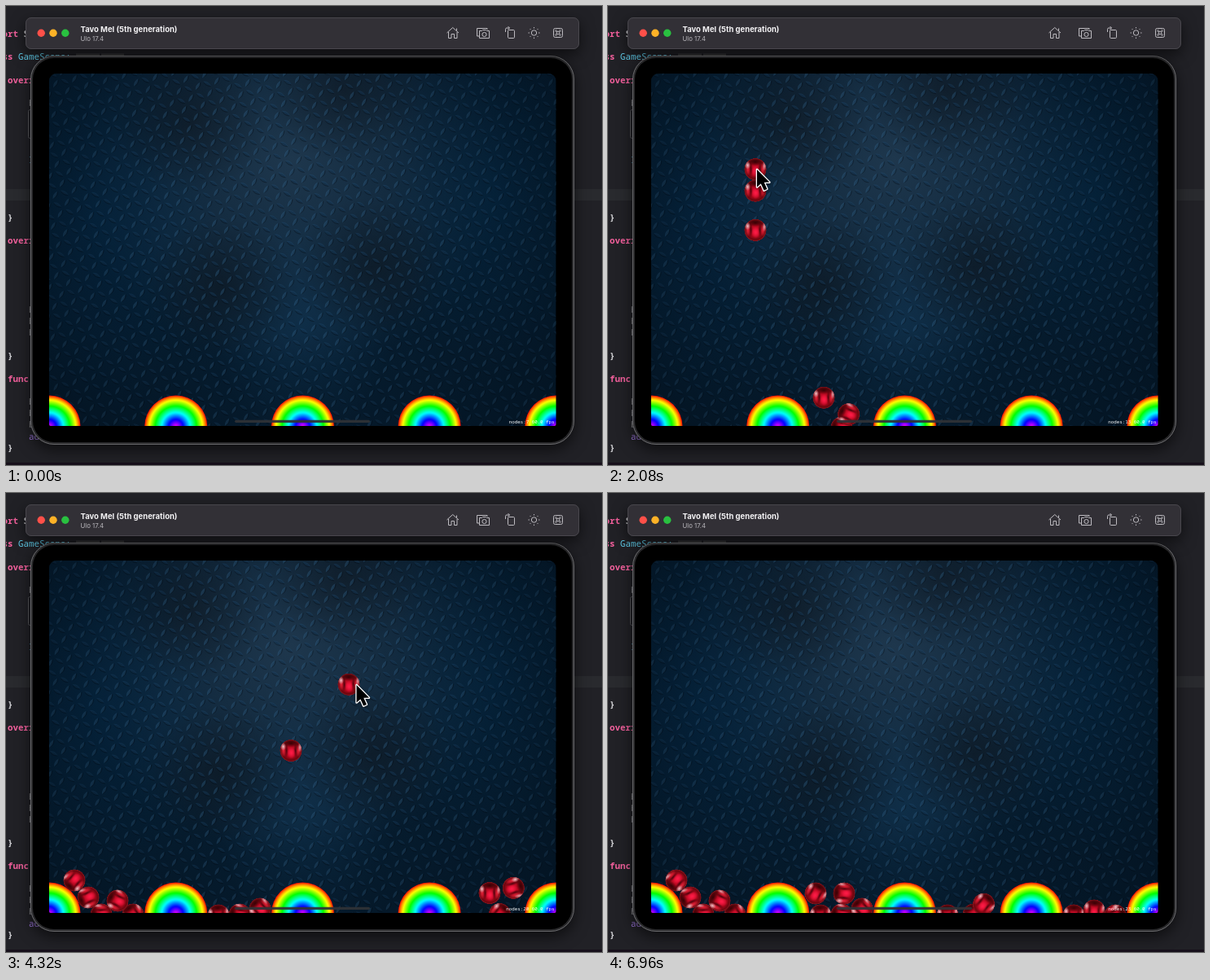
An HTML page with a canvas that plays this animation: 732 px wide and 564 px high, repeating every 7040 ms.

```html
<!DOCTYPE html>
<html lang="en">
<head>
<meta charset="utf-8">
<title>Falling balls</title>
<style>
  html, body { margin: 0; width: 100%; height: 100%; overflow: hidden; background: #212126; }
  canvas { display: block; }
</style>
</head>
<body>
<canvas id="stage" width="732" height="564"></canvas>
<script>
const W = 732, H = 564, LOOP = 7.04, STEP = 0.08;
const GRAVITY = 894, BOUNCE = 0.4, R = 13.5, FLOOR = 519, TAU = Math.PI * 2;
const SCREEN = { x: 53, y: 83, w: 622.5, h: 433 };
const BUMPER_R = 38.5, BUMPER_Y = 517, REACH = BUMPER_R + R;
const bumpers = [0, 1, 2, 3, 4].map(i => 53 + i * 155.7);
const MONO = '"Noto Sans Mono", "DejaVu Sans Mono", monospace';
const SANS = 'Inter, Roboto, sans-serif';

const mix = (a, b, k) => a + (b - a) * k;
const smooth = v => { const k = Math.min(1, Math.max(0, v)); return k * k * (3 - 2 * k); };

const layer = (w, h, paint) => {
  const c = document.createElement('canvas');
  c.width = w; c.height = h;
  paint(c.getContext('2d'));
  return c;
};

const box = (g, x, y, w, h, r) => { g.beginPath(); g.roundRect(x, y, w, h, r); };

const disc = (g, x, y, r, fill) => {
  g.beginPath(); g.arc(x, y, r, 0, TAU);
  g.fillStyle = fill; g.fill();
};

const ring = (g, x, y, r) => { g.beginPath(); g.arc(x, y, r, 0, TAU); g.stroke(); };

const text = (g, s, x, y, font, fill) => {
  g.font = font; g.fillStyle = fill; g.fillText(s, x, y);
};

const glow = (g, x, y, rx, ry, rgb, alpha) => {
  g.save();
  g.translate(x, y); g.scale(rx, ry);
  const f = g.createRadialGradient(0, 0, 0, 0, 0, 1);
  f.addColorStop(0, `rgba(${rgb},${alpha})`);
  f.addColorStop(0.5, `rgba(${rgb},${alpha * 0.5})`);
  f.addColorStop(1, `rgba(${rgb},0)`);
  disc(g, 0, 0, 1, f);
  g.restore();
};

const shadow = (g, blur, dy, alpha) => {
  g.shadowColor = `rgba(0,0,0,${alpha})`;
  g.shadowBlur = blur; g.shadowOffsetY = dy;
};

// Shadowed panel with a hairline border.
function panel(g, x, y, w, h, r, fill, border) {
  g.save();
  shadow(g, 18, 6, 0.6);
  box(g, x, y, w, h, r); g.fillStyle = fill; g.fill();
  g.restore();
  box(g, x + 0.5, y + 0.5, w - 1, h - 1, r - 0.5);
  g.strokeStyle = border; g.lineWidth = 1; g.stroke();
}

function paintEditor(g) {
  g.fillStyle = '#212126'; g.fillRect(0, 0, W, H);
  g.fillStyle = '#292a2e'; g.fillRect(0, 225, W, 14);
  g.fillStyle = '#17101b'; g.fillRect(0, 561, W, 3);
  const pink = '#f2609c', plain = '#d6d6d9', grey = '#85858a';
  const code = (row, col, s, fill, weight = '') =>
    text(g, s, col * 6.5 - 24, 38 + row * 14.13, `${weight} 10.8px ${MONO}`, fill);
  code(0, 0, 'import', pink, 'bold');
  code(0, 7, 'S', plain, 'bold');
  code(2, 0, 'class', pink, 'bold');
  code(2, 6, 'GameScene:', '#62d0ee');
  for (const row of [4, 18]) code(row, 4, 'override', pink, 'bold');
  code(30, 4, 'func', pink, 'bold');
  for (const row of [16, 28, 36]) code(row, 4, '}', plain, 'bold');
  for (const row of [6, 24, 25, 26, 32, 33, 34]) code(row, 8, 'b', grey);
  code(11, 8, 'l', '#4d8fa8');
  code(19, 8, '!', '#e0484c');
  code(35, 8, 'addChild', '#9a74d8');
  box(g, 27.5, 127.5, 30, 35, 2); g.strokeStyle = '#55555a'; g.lineWidth = 1; g.stroke();
}

function paintToolbar(g) {
  panel(g, 24, 14, 680, 39, 7, '#323036', '#49474d');
  ['#ff5049', '#fdb227', '#29c140'].forEach((c, i) => disc(g, 43.2 + i * 14.8, 33.3, 4.7, c));
  text(g, 'Tavo Mel (5th generation)', 91.5, 32, `bold 9.5px ${SANS}`, '#f4f3f5');
  text(g, 'Ulo 17.4', 91.5, 42.5, `7.8px ${SANS}`, '#b9b7bc');

  g.strokeStyle = '#bdbbc0'; g.lineWidth = 1;
  const line = d => g.stroke(new Path2D(d));
  line('M541.5 33 L548.7 26.5 L556 33 M543.5 32 V39.5 H547 V34.5 H550.5 V39.5 H554 V32 M553.5 30.5 V27.5');
  line('M581 37 H578.5 V27.5 H591 V29 M581.5 30.5 H584.5 L585.5 29.5 H589.5 L590.5 30.5 H593.5 V39.5 H581.5 Z');
  ring(g, 587.5, 35, 2.6);
  box(g, 616.5, 29.5, 8, 10, 1.2); g.stroke();
  line('M613.5 32 V28.5 Q613.5 27 615 27 H618.5 M616.5 25 L618.5 27 L616.5 29');
  ring(g, 648.5, 33, 3.2);
  for (let i = 0; i < 8; i++) {
    const c = Math.cos(i * TAU / 8), s = Math.sin(i * TAU / 8);
    line(`M${648.5 + c * 5.6} ${33 + s * 5.6} L${648.5 + c * 7} ${33 + s * 7}`);
  }
  box(g, 672.5, 27.5, 11, 11, 2); g.stroke();
  g.lineWidth = 0.8;
  g.strokeRect(676.5, 31.5, 3, 3);
  for (const x of [675.5, 680.5]) for (const y of [30.5, 35.5]) ring(g, x, y, 1);
}

function paintTablet(g) {
  g.fillStyle = '#39393c';
  g.fillRect(86, 58.5, 29, 3); g.fillRect(117, 58.5, 28, 3);
  panel(g, 30, 61, 668, 478, 29, '#29292b', '#69696c');
  box(g, 33, 64, 662, 472, 26); g.fillStyle = '#000'; g.fill();
}

// Tread plate: a tilted lattice of lens-shaped bars, turned by 90 degrees in a checkerboard.
function paintPlate(g) {
  const { x, y, w, h } = SCREEN;
  g.fillStyle = '#061d30'; g.fillRect(x, y, w, h);
  glow(g, 350, 190, 270, 260, '46,72,96', 0.6);
  glow(g, 110, 260, 150, 240, '4,46,80', 0.5);
  glow(g, 600, 230, 130, 220, '4,46,78', 0.5);
  glow(g, 365, 390, 110, 150, '20,62,96', 0.4);
  for (const [dx, dy] of [[225, 145], [415, 105], [265, 345], [450, 320]]) glow(g, dx, dy, 95, 85, '12,18,25', 0.5);

  const tilt = -Math.PI / 12, pitch = 12;
  const c = Math.cos(tilt) * pitch, s = Math.sin(tilt) * pitch;
  const lens = new Path2D('M-5.4 0 Q0 -3.4 5.4 0 Q0 3.4 -5.4 0 Z');
  for (let i = -38; i <= 38; i++) for (let j = -38; j <= 38; j++) {
    const px = 364 + i * c - j * s, py = 300 + i * s + j * c;
    if (px < x - 8 || px > x + w + 8 || py < y - 8 || py > y + h + 8) continue;
    const steep = (i + j) & 1;
    g.save();
    g.translate(px, py);
    g.rotate(tilt + (steep ? -1 : 1) * Math.PI / 4);
    g.translate(0.6, 1);
    g.fillStyle = 'rgba(0,6,14,.34)'; g.fill(lens);
    g.translate(-0.6, -1);
    g.fillStyle = steep ? 'rgba(58,112,156,.34)' : 'rgba(34,84,126,.3)'; g.fill(lens);
    g.restore();
  }

  const dim = g.createRadialGradient(350, 250, 150, 364, 280, 400);
  dim.addColorStop(0, 'rgba(0,10,20,0)');
  dim.addColorStop(1, 'rgba(0,10,20,.5)');
  g.fillStyle = dim; g.fillRect(x, y, w, h);
}

// Hue runs from magenta in the middle to red at the rim.
function paintBumper(g, x) {
  const f = g.createRadialGradient(x, BUMPER_Y, 0, x, BUMPER_Y, BUMPER_R);
  for (let u = 0; u <= 1; u += 1 / 32) f.addColorStop(u, `hsl(${300 * (1 - u) ** 0.85} 100% 50%)`);
  disc(g, x, BUMPER_Y, BUMPER_R, f);
}

const screenPath = g => box(g, SCREEN.x, SCREEN.y, SCREEN.w, SCREEN.h, [9, 9, 2, 2]);

const backdrop = layer(W, H, g => {
  paintEditor(g);
  paintTablet(g);
  paintToolbar(g);
  screenPath(g); g.clip();
  paintPlate(g);
  bumpers.forEach(x => paintBumper(g, x));
});

const SPRITE = 4;
const ballSprite = layer(30 * SPRITE, 30 * SPRITE, g => {
  g.scale(SPRITE, SPRITE); g.translate(15, 15);
  g.beginPath(); g.arc(0, 0, R, 0, TAU); g.clip();
  const f = g.createRadialGradient(0, 2, 0, 0, 0, R);
  f.addColorStop(0, '#f0143a'); f.addColorStop(0.5, '#b3081e');
  f.addColorStop(0.85, '#6a060e'); f.addColorStop(1, '#8c1620');
  disc(g, 0, 0, R, f);
  glow(g, 0, -9, 10, 5, '40,0,2', 0.85);
  for (const side of [-1, 1]) {
    glow(g, side * 5.7, 0, 2.6, 9, '40,0,4', 0.75);
    glow(g, side * 9.3, 0, 3.4, 8, '245,40,62', 0.85);
  }
  glow(g, 0.5, 3, 5, 7, '255,28,72', 0.95);
  glow(g, -9.5, -5, 3.5, 5, '255,215,220', 0.9);
  glow(g, 11, -4, 2.5, 6, '255,200,208', 0.8);
});

// Height at which a ball centred on x touches a bumper or the floor.
function surface(x) {
  const c = bumpers.find(b => Math.abs(b - x) < REACH);
  return c === undefined ? FLOOR : BUMPER_Y - Math.sqrt(REACH ** 2 - (x - c) ** 2);
}

const balls = [];
const drop = (t, x, y, restX, restY) =>
  balls.push({ t, x, y, restX, restY, fall: Math.sqrt(2 * (surface(x) - y) / GRAVITY) });

const TAP_Y = 230;
drop(0.445, 342, TAP_Y, 287, 518);
drop(0.65, 342, TAP_Y, 312, 511);
drop(1.1, 265, 247, 261, 519);
[[156, 518], [117, 518], [101, 497], [137, 501], [84, 476]]
  .forEach(([x, y], i) => drop(1.657 + i * 0.155, 181, 195, x, y));
drop(2.88, 577, TAP_Y, 623, 519);
drop(3.058, 571, TAP_Y, 572, 519);
drop(3.396, 594, TAP_Y, 597, 513);
drop(3.88, 350, TAP_Y, 290, 492);
drop(4.212, 421, TAP_Y, 417, 519);
drop(4.733, 489, TAP_Y, 255, 492);
drop(4.97, 474, TAP_Y, 449, 518);
drop(5.447, 433, TAP_Y, 469, 503);

// Free flight with bounces off bumpers and floor.
function flight({ x, y }, age) {
  const dt = 0.004;
  let vx = 0, vy = 0;
  const reflect = (nx, ny) => {
    const v = vx * nx + vy * ny;
    if (v < 0) { vx -= (1 + BOUNCE) * v * nx; vy -= (1 + BOUNCE) * v * ny; }
  };
  for (let n = Math.round(age / dt); n > 0; n--) {
    x += vx * dt;
    y += vy * dt + GRAVITY / 2 * dt * dt;
    vy += GRAVITY * dt;
    for (const c of bumpers) {
      const d = Math.hypot(x - c, y - BUMPER_Y);
      if (d >= REACH) continue;
      const nx = (x - c) / d, ny = (y - BUMPER_Y) / d;
      x = c + nx * REACH; y = BUMPER_Y + ny * REACH;
      reflect(nx, ny);
    }
    if (y > FLOOR) { y = FLOOR; reflect(0, -1); }
  }
  return [x, y];
}

// After its first bounces a ball eases into its place in the pile.
function place(b, t) {
  const age = t - b.t, k = smooth((age - b.fall - 0.25) / 0.65);
  if (k === 1) return [b.restX, b.restY];
  const [fx, fy] = flight(b, age);
  const x = mix(fx, b.restX, k);
  return [x, Math.min(mix(fy, b.restY, k), surface(x))];
}

const arrow = new Path2D('M0 0 V21.5 L4.8 17.2 L8.6 25.6 L12.4 23.9 L8.7 15.8 L15.4 15.6 Z');

// The pointer glides from one tap to the next.
function drawPointer(g, t) {
  if (t < 0.16 || t > 6.4) return;
  const to = balls.find(b => b.t > t) ?? balls.at(-1);
  const from = balls.findLast(b => b.t <= t) ?? to;
  const k = to === from ? 1 : smooth((t - from.t) / (to.t - from.t));
  g.save();
  g.translate(mix(from.x, to.x, k) + 2, mix(from.y, to.y, k) + 6);
  g.save();
  shadow(g, 3, 1, 0.5);
  g.lineJoin = 'round'; g.lineWidth = 2.6; g.strokeStyle = '#fff'; g.stroke(arrow);
  g.restore();
  g.fillStyle = '#000'; g.fill(arrow);
  g.restore();
}

const ctx = document.getElementById('stage').getContext('2d');

function draw(t) {
  ctx.drawImage(backdrop, 0, 0);
  const live = balls.filter(b => t >= b.t);
  ctx.save();
  screenPath(ctx); ctx.clip();
  for (const b of live) {
    const [x, y] = place(b, t);
    ctx.save();
    ctx.translate(x, y); ctx.rotate((x - b.x) / (R * 3));
    ctx.drawImage(ballSprite, -15, -15, 30, 30);
    ctx.restore();
  }
  box(ctx, 281, 508.7, 166, 3.2, 1.6);
  ctx.fillStyle = 'rgba(48,50,54,.93)'; ctx.fill();
  ctx.textAlign = 'right';
  text(ctx, `nodes:${7 + live.length} 60.0 fps`, 673.5, 513, `5.8px ${MONO}`, '#fff');
  ctx.restore();
  drawPointer(ctx, t);
}

const start = performance.now();
function tick() {
  const t = ((performance.now() - start) / 1000) % LOOP;
  draw(Math.floor(t / STEP + 1e-6) * STEP);
  requestAnimationFrame(tick);
}
tick();
</script>
</body>
</html>
```
